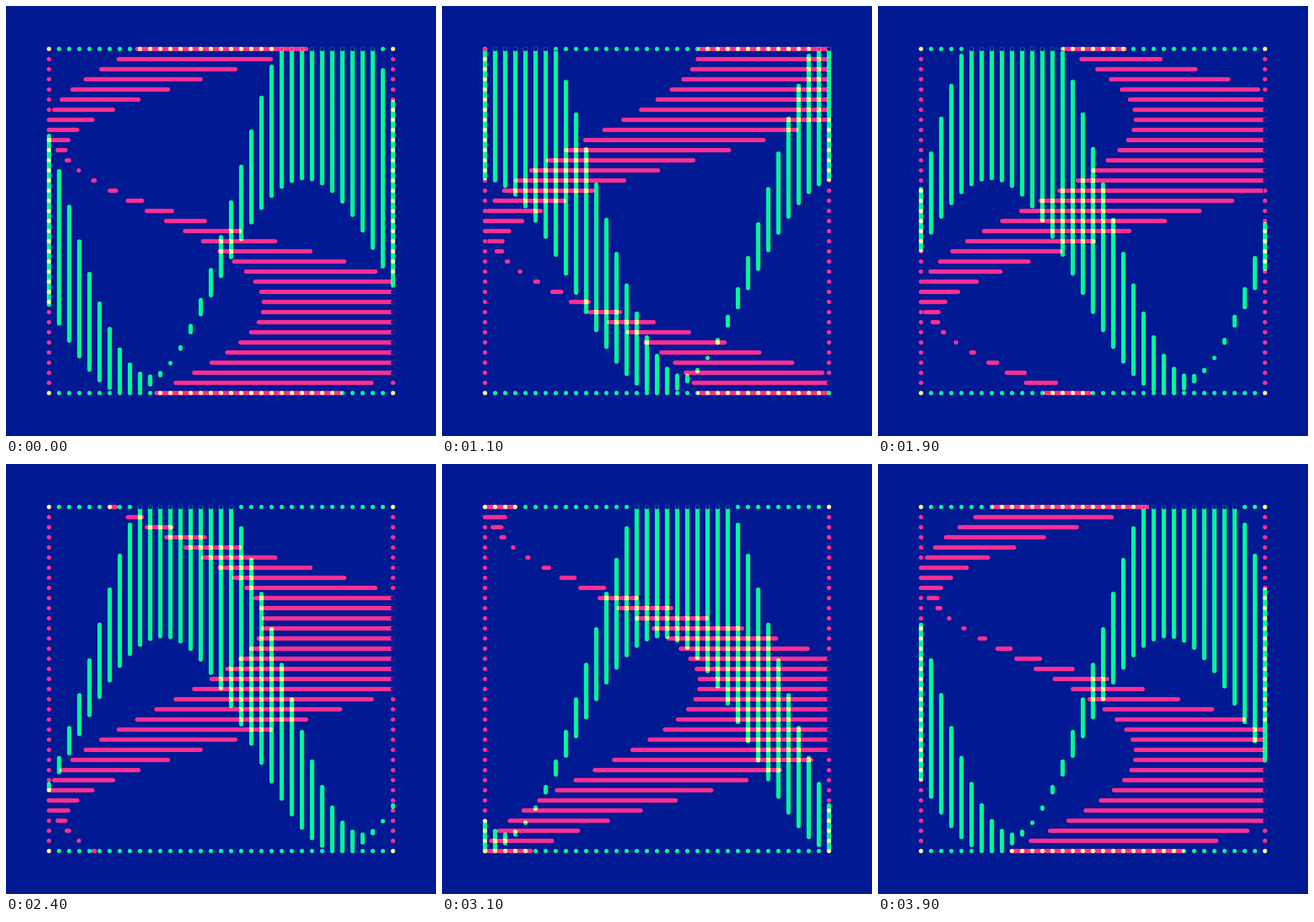
Recreate the animation shown at these times as an HTML page with a canvas. Size 748x748 px, loop 4000 ms.

```html
<!DOCTYPE html>
<html lang="en">
<head>
<meta charset="utf-8">
<title>Woven waves</title>
<style>
  html, body { margin: 0; width: 100%; height: 100%; overflow: hidden; background: #011993; }
  canvas { display: block; }
</style>
</head>
<body>
<canvas id="stage" width="748" height="748"></canvas>
<script>
const SIZE = 748, COUNT = 35, LOOP = 4000, STEP = 100;
const NEAR = SIZE * 0.9, FAR = SIZE * 0.1;
const GAP = (NEAR - FAR) / (COUNT - 1);
const WIDTH = SIZE * 0.01, AMP = SIZE * 0.25;
const CREST = 7.75;
const BLUE = '#011993', PINK = '#ff2f92', GREEN = '#00fa92';

const stage = document.getElementById('stage').getContext('2d');
const layer = document.createElement('canvas');
layer.width = layer.height = SIZE;
const pen = layer.getContext('2d');

const posOf = i => FAR + i * GAP;

function dots(y) {
  const radius = WIDTH / 2;
  pen.beginPath();
  for (let i = 0; i < COUNT; i++) {
    const x = posOf(i);
    pen.moveTo(x + radius, y);
    pen.arc(x, y, radius, 0, Math.PI * 2);
  }
  pen.fill();
}

function bars(turn) {
  pen.beginPath();
  for (let i = 0; i < COUNT; i++) {
    const angle = 2 * Math.PI * ((i - CREST) / COUNT - turn);
    const low = SIZE * 0.65 + AMP * Math.cos(angle);
    const length = AMP * (1 - Math.cos(angle - Math.PI / 4));
    const high = Math.max(FAR, low - Math.max(length, 0.02));
    pen.moveTo(posOf(i), low);
    pen.lineTo(posOf(i), high);
  }
  pen.stroke();
}

// One weave of bars; the far row of dots punches holes where bars reach it.
function weave(color, quarterTurn, turn) {
  pen.setTransform(1, 0, 0, 1, 0, 0);
  pen.globalCompositeOperation = 'source-over';
  pen.clearRect(0, 0, SIZE, SIZE);
  if (quarterTurn) pen.setTransform(0, 1, -1, 0, SIZE, 0);
  pen.fillStyle = pen.strokeStyle = color;
  pen.lineWidth = WIDTH;
  pen.lineCap = 'round';
  bars(turn);
  dots(NEAR);
  pen.globalCompositeOperation = 'xor';
  dots(FAR);
  stage.drawImage(layer, 0, 0);
}

function draw(time) {
  // The half millisecond absorbs rounding in the clock.
  const turn = Math.floor((time + 0.5) / STEP) * STEP % LOOP / LOOP;
  stage.globalCompositeOperation = 'source-over';
  stage.fillStyle = BLUE;
  stage.fillRect(0, 0, SIZE, SIZE);
  stage.globalCompositeOperation = 'lighten';
  weave(PINK, true, turn);
  weave(GREEN, false, turn);
}

let start;
function tick(now) {
  start ??= now;
  draw(now - start);
  requestAnimationFrame(tick);
}
draw(0);
requestAnimationFrame(tick);
</script>
</body>
</html>
```
